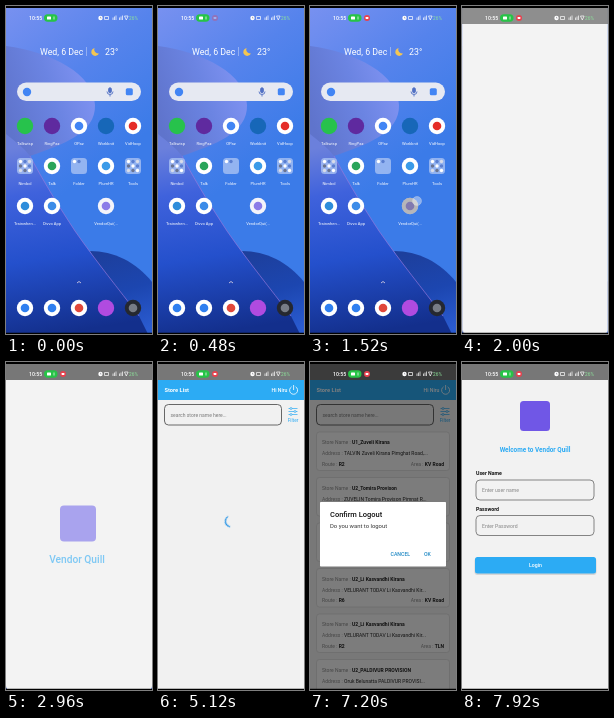
These frames come from a looping animation (146 by 328 pixels, 8 s). An HTML page:

```html
<!DOCTYPE html>
<html lang="en">
<head>
<meta charset="utf-8">
<title>Store app walkthrough</title>
<style>
html, body { margin: 0; width: 100%; height: 100%; overflow: hidden; background: #000; }
svg { display: block; width: 100vw; height: 100vh; font-family: Roboto, sans-serif; }
.loop { animation: 8s linear infinite both; }
.b { font-weight: 700; }
.m { font-weight: 500; }
.mid { text-anchor: middle; }
.end { text-anchor: end; }

#rec { animation-name: rec; }
@keyframes rec { 0%, 5% { opacity: 0; } 8%, 100% { opacity: 1; } }

#press { animation-name: press; }
@keyframes press { 0%, 17% { opacity: 0; } 18.5%, 20.5% { opacity: 1; } 23%, 100% { opacity: 0; } }

#window { animation-name: open; transform-origin: 100px 200px; }
@keyframes open {
  0%, 20.5% { opacity: 0; transform: scale(.08, .05); animation-timing-function: cubic-bezier(.2, .6, .2, 1); }
  22% { opacity: 1; }
  25.5%, 100% { opacity: 1; transform: none; }
}
#bar { animation-name: bar; }
@keyframes bar { 0%, 23% { opacity: 0; } 25.5%, 100% { opacity: 1; } }

#splash { animation-name: splash; }
@keyframes splash { 0%, 27% { opacity: 0; } 37% { opacity: .62; } 43%, 100% { opacity: 1; } }

#list { animation-name: list; }
@keyframes list { 0%, 43.5% { opacity: 0; } 45.5%, 100% { opacity: 1; } }

#loader { animation-name: loader; }
@keyframes loader { 0%, 65.99% { opacity: 1; } 66%, 100% { opacity: 0; } }
#cards { animation-name: cards; }
@keyframes cards { 0%, 65.99% { opacity: 0; } 66%, 100% { opacity: 1; } }

.spin, .hop, .arc { transform-origin: 0 0; }
.spin { animation: spin 8s linear infinite; }
.hop { animation: hop 8s steps(6) 120ms infinite; }
.arc { animation: arc 1333.333ms ease-in-out 120ms infinite; }
@keyframes spin { from { transform: rotate(33deg); } to { transform: rotate(1473deg); } }
@keyframes hop { from { transform: rotate(0deg); } to { transform: rotate(1620deg); } }
@keyframes arc {
  0% { stroke-dasharray: 2 100; stroke-dashoffset: 0; }
  50% { stroke-dasharray: 75 100; stroke-dashoffset: 0; }
  100% { stroke-dasharray: 2 100; stroke-dashoffset: -75; }
}

#dim { animation-name: dim; }
@keyframes dim { 0%, 77% { opacity: 0; } 80%, 91.5% { opacity: .5; } 94%, 100% { opacity: 0; } }
#dialog { animation-name: dialog; transform-origin: 73px 172px; }
@keyframes dialog {
  0%, 77% { opacity: 0; transform: scale(.9); animation-timing-function: ease-out; }
  79.5%, 91.5% { opacity: 1; transform: none; }
  93.5%, 100% { opacity: 0; transform: none; }
}
#login { animation-name: login; }
@keyframes login { 0%, 94% { opacity: 0; } 96%, 100% { opacity: 1; } }
</style>
</head>
<body>
<svg viewBox="0 0 146 328" preserveAspectRatio="none">
  <defs>
    <linearGradient id="sky" gradientUnits="userSpaceOnUse" x1="0" y1="0" x2="110" y2="150">
      <stop offset="0" stop-color="#7891f0"/><stop offset=".5" stop-color="#5583ec"/><stop offset="1" stop-color="#3b7be8"/>
    </linearGradient>
    <linearGradient id="petal" gradientUnits="userSpaceOnUse" x1="0" y1="110" x2="88" y2="80">
      <stop offset="0" stop-color="#5f74cc"/><stop offset=".55" stop-color="#6b84e2"/><stop offset="1" stop-color="#8093f2"/>
    </linearGradient>
    <linearGradient id="sheet" gradientUnits="userSpaceOnUse" x1="20" y1="140" x2="50" y2="328">
      <stop offset="0" stop-color="#6b80dc"/><stop offset=".25" stop-color="#3f62dc"/>
      <stop offset=".6" stop-color="#2450cc"/><stop offset="1" stop-color="#132f8c"/>
    </linearGradient>
    <linearGradient id="wave" gradientUnits="userSpaceOnUse" x1="100" y1="245" x2="125" y2="328">
      <stop offset="0" stop-color="#1d3f9c"/><stop offset=".5" stop-color="#1c46b0"/><stop offset="1" stop-color="#2a5bd0"/>
    </linearGradient>
  </defs>

  <g id="home">
    <rect width="146" height="328" fill="url(#sky)"/>
    <path d="M84 245C108 245 130 256 146 276V328H128Z" fill="url(#wave)"/>
    <path d="M0 40C46 46 88 68 89 99C90 127 56 139 24 150L0 156Z" fill="url(#petal)"/>
    <path d="M0 128C10 136 18 142 24 150C40 180 54 202 69 225C92 258 112 282 133 310L142 328H0Z" fill="url(#sheet)"/>
    <path d="M24 150C40 180 54 202 69 225C92 258 112 282 133 310" fill="none" stroke="#9a78dc" stroke-width="1" opacity=".65"/>
    <g fill="#fff" font-size="8.8">
      <text x="34" y="48.5">Wed, 6 Dec</text>
      <path d="M80.5 41v9" stroke="#fff" stroke-width=".5" opacity=".7"/>
      <path d="M88.5 42a4 4 0 1 0 4.5 5.5a4 4 0 0 1-4.5-5.5Z" fill="#f4c652"/>
      <text x="99" y="48.5">23°</text>
    </g>
    <rect x="11" y="76.5" width="124" height="18.5" rx="9.25" fill="#e6e9f2"/>
    <circle cx="21" cy="86" r="4.2" fill="#4285f4"/>
    <g fill="none" stroke="#5271c4" stroke-width=".9">
      <rect x="102.6" y="81.8" width="2.8" height="5" rx="1.4" fill="#5271c4"/>
      <path d="M101 85.5a3 3 0 0 0 6 0M104 88.5v2"/>
    </g>
    <rect x="119.8" y="82.3" width="7" height="7" rx="1.5" fill="#4285f4"/>
    <g id="apps"></g>
    <path d="M71 277l2-1.5l2 1.5" fill="none" stroke="#e8dbe8" stroke-width=".8"/>
    <g id="press" class="loop">
      <circle cx="100" cy="200" r="8.2" fill="#777" opacity=".5"/>
      <circle cx="107" cy="195" r="4.5" fill="#fff" fill-opacity=".4" stroke="#ddd" stroke-opacity=".6" stroke-width=".6"/>
    </g>
  </g>

  <rect id="window" class="loop" width="146" height="328" rx="4" fill="#f3f3f3"/>

  <g id="splash" class="loop">
    <rect x="54" y="143.5" width="36" height="36" rx="4" fill="#7b72ea"/>
    <text x="71" y="201" class="mid m" font-size="10.2" fill="#36aef5">Vendor Quill</text>
  </g>

  <g id="list" class="loop">
    <rect y="18" width="146" height="310" fill="#f1f1f1"/>
    <rect y="18" width="146" height="20" fill="#2cabf4"/>
    <g fill="#fff">
      <text x="6.5" y="30.2" class="b" font-size="5.7">Store List</text>
      <text x="129.5" y="29.5" class="end m" font-size="5.2">Hi Niru</text>
    </g>
    <path d="M133.6 24.8a4 4 0 1 0 4 0M135.6 23v5" fill="none" stroke="#fff" stroke-width=".8"/>
    <rect x="6.5" y="42.5" width="117" height="20.5" rx="4" fill="none" stroke="#444" stroke-width=".8"/>
    <text x="12.5" y="54.7" font-size="5" fill="#777">search store name here...</text>
    <g fill="#f1f1f1" stroke="#2cabf4" stroke-width=".7">
      <path d="M130.5 46.5h9M130.5 49.5h9M130.5 52.5h9"/>
      <circle cx="133" cy="46.5" r="1"/><circle cx="137" cy="49.5" r="1"/><circle cx="133" cy="52.5" r="1"/>
    </g>
    <text x="135" y="60" class="mid" font-size="4.8" fill="#2cabf4">Filter</text>
    <g id="loader" class="loop">
      <g transform="translate(73 159.3)"><g class="spin"><g class="hop">
        <circle class="arc" r="5.6" pathLength="100" fill="none" stroke="#2e97e6" stroke-width="1.4"/>
      </g></g></g>
    </g>
    <g id="cards" class="loop" font-size="5"></g>
  </g>

  <rect id="bar" class="loop" width="146" height="18" fill="#777"/>
  <rect id="dim" class="loop" width="146" height="328"/>

  <g id="dialog" class="loop">
    <rect x="10" y="140" width="126" height="64.5" rx=".8" fill="#fff"/>
    <text x="20" y="154.8" class="m" font-size="7.5" fill="#111">Confirm Logout</text>
    <text x="20" y="166" font-size="5.9" fill="#333">Do you want to logout</text>
    <g class="m" font-size="5.2" fill="#1e88c4">
      <text x="80.5" y="194">CANCEL</text>
      <text x="114" y="194">OK</text>
    </g>
  </g>

  <g id="login" class="loop">
    <rect y="18" width="146" height="310" fill="#f2f2f2"/>
    <rect x="58" y="39" width="30" height="30" rx="3.5" fill="#7057e6"/>
    <text x="73" y="89.5" class="mid b" font-size="6.4" fill="#2cabf4">Welcome to Vendor Quill</text>
    <g class="b" font-size="5.2" fill="#111">
      <text x="14" y="113">User Name</text>
      <text x="14" y="149">Password</text>
    </g>
    <g fill="none" stroke="#555" stroke-width=".7">
      <rect x="14" y="118" width="118" height="20" rx="4"/>
      <rect x="14" y="153.5" width="118" height="20" rx="4"/>
    </g>
    <g font-size="5.1" fill="#858585">
      <text x="20" y="130">Enter user name</text>
      <text x="20" y="165.5">Enter Password</text>
    </g>
    <rect x="12.5" y="196" width="122" height="17" rx="3" opacity=".12"/>
    <rect x="13" y="195" width="121" height="16.5" rx="2.5" fill="#2cabf4"/>
    <text x="73.5" y="205" class="mid m" font-size="5.2" fill="#fff">Login</text>
  </g>

  <g id="status" fill="#fff">
    <text x="23" y="14.2" class="m" font-size="5.2">10:55</text>
    <rect x="38" y="8.3" width="13.5" height="7.4" rx="3.7" fill="#27c447"/>
    <rect x="41" y="10.5" width="4" height="3" rx=".6"/>
    <path d="M48 10.5v3" stroke="#fff" stroke-width=".7"/>
    <g id="rec" class="loop">
      <circle cx="57" cy="12" r="3" fill="#e8414e"/>
      <rect x="55.6" y="11" width="2.8" height="2" rx=".4"/>
    </g>
    <circle cx="94.5" cy="12" r="2.2"/>
    <path d="M94.5 10.8v1.3h1" fill="none" stroke="#667" stroke-width=".5"/>
    <path d="M98.5 10.5h4v3h-4ZM107 14v-2.5M108.5 14v-3.5M110 14v-4.5M113.5 14v-2.5M115 14v-3.5M116.5 14v-4.5M118.5 10l1.8 4l1.8-4Z" fill="none" stroke="#fff" stroke-width=".7"/>
    <text x="123" y="14" font-size="4.8" fill="#8de39b">26%</text>
  </g>
  <path d="M0 0h146v2H0ZM0 326.8h146V328H0Z"/>
</svg>
<script>
const columns = [19, 46, 73, 100, 127];
const disc = (x, y, fill, r = 8.2) => `<circle cx="${x}" cy="${y}" r="${r}" fill="${fill}"/>`;
const label = (x, y, s) => `<text x="${x}" y="${y}" class="mid" font-size="4.1" fill="#fff">${s}</text>`;

// Rounded tile with up to nine small app dots
function folder(x, y, count) {
  const tints = ["#fff", "#5b7fd0", "#d8dce8", "#6a7490"];
  let s = `<rect x="${x - 8}" y="${y - 8}" width="16" height="16" rx="3.5" fill="#a9c2f2" opacity=".8"/>`;
  for (let i = 0; i < count; i++)
    s += disc(x - 4.5 + i % 3 * 4.5, y - 4.5 + Math.floor(i / 3) * 4.5, tints[i % 4], 1.7);
  return s;
}

// Each app: column, name, disc colour or folder size, inner colour
const rows = [
  [120, [[0, "Talkwisp", "#27c24c"], [1, "RingPaz", "#5f2a9f"], [2, "OPaz", "#fff", "#4285f4"],
         [3, "Workknit", "#1767b8"], [4, "VidHoop", "#fff", "#e52d27"]]],
  [160, [[0, "Nimbol", 9], [1, "Talk", "#fff", "#2aa55a"], [2, "Folder", 2],
         [3, "PlumHR", "#fff", "#3b9be8"], [4, "Tools", 9]]],
  [200, [[0, "Trainwhen...", "#fff", "#2e8ddb"], [1, "Divvo App", "#fff", "#3c8ce8"],
         [3, "VendorQui(...", "#f4f4fa", "#8b7be8"]]],
  [302, [[0, "", "#fff", "#2f7ff0"], [1, "", "#fff", "#2f7ff0"], [2, "", "#fff", "#e0473a"],
         [3, "", "#b04be0"], [4, "", "#252830", "#777c86"]]]
];
document.getElementById("apps").innerHTML = rows.map(([y, apps]) =>
  apps.map(([col, name, fill, inner]) => {
    const x = columns[col];
    return (typeof fill === "number" ? folder(x, y, fill) : disc(x, y, fill)) +
      (inner ? disc(x, y, inner, 4.3) : "") + label(x, y + 18.8, name);
  }).join("")).join("");

const stores = [
  ["U1_Zuveli Kirana", "TALVIN Zuveli Kirana Pimghat Road,...", "R2", "KV Road"],
  ["U2_Tomira Provison", "ZUVELIN Tomira Provison Pimnat R...", "R2", "KV Road"],
  ["U2_Li Kasvandhi Kirana", "VELURANT TODAV Li Kasvandhi Kir...", "R6", "KV Road"],
  ["U2_Li Kasvandhi Kirana", "VELURANT TODAV Li Kasvandhi Kir...", "R6", "KV Road"],
  ["U2_Li Kasvandhi Kirana", "VELURANT TODAV Li Kasvandhi Kir...", "R2", "TLN"],
  ["U2_PALDIVUR PROVISION", "Oruk Belunatta PALDIVUR PROVISI...", "R2", "TLN"]
];
const field = (x, y, name, value, bold, cls = "") =>
  `<text x="${x}" y="${y}" class="${cls}" fill="#888">${name} : <tspan class="${bold ? "b" : ""}" fill="#222">${value}</tspan></text>`;
document.getElementById("cards").innerHTML = stores.map(([name, address, route, area], i) => {
  const y = 70 + i * 45.5;
  return `<rect x="6.5" y="${y}" width="133" height="38.5" rx="3" fill="#fafafa" stroke="#d2d2d2" stroke-width=".6"/>` +
    field(12, y + 12, "Store Name", name, true) +
    field(12, y + 23, "Address", address) +
    field(12, y + 33.5, "Route", route, true) +
    field(134, y + 33.5, "Area", area, true, "end");
}).join("");
</script>
</body>
</html>
```
